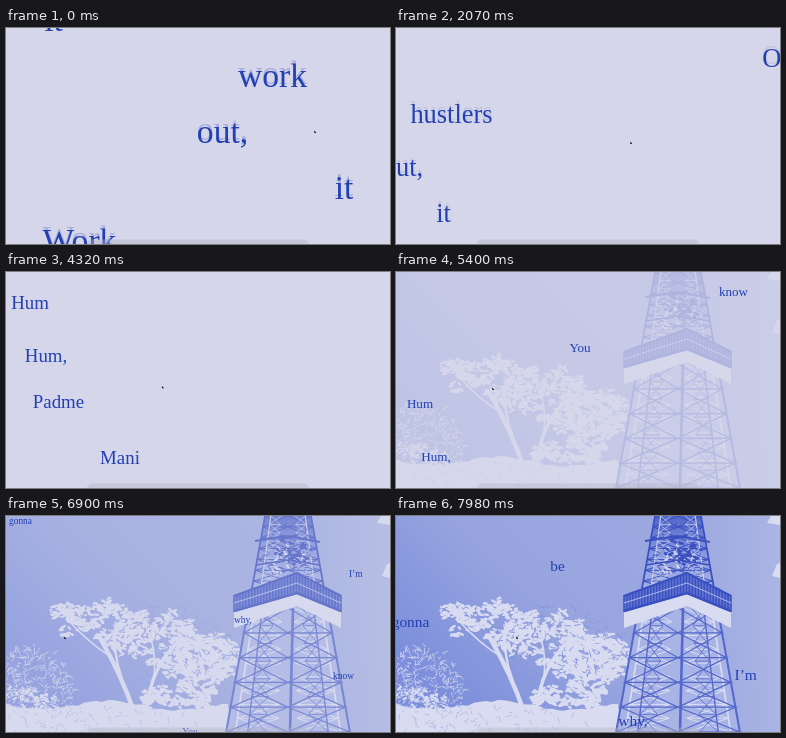
These frames come from a looping animation (384x216 px, 8000 ms). An HTML page with a canvas:

```html
<!DOCTYPE html>
<html lang="en">
<head>
<meta charset="utf-8">
<title>Falling words</title>
<style>
html, body { margin: 0; width: 100%; height: 100%; overflow: hidden; background: #d5d6e9; }
canvas { display: block; width: 100vw; height: 100vh; }
</style>
</head>
<body>
<canvas id="stage" width="384" height="216"></canvas>
<script>
const W = 384, H = 216, LOOP = 8000, STEP = 30;
const ctx = document.getElementById('stage').getContext('2d');
const PALE = '#d9dcf0', MID = '#8293dc', BLUE = '#5468cb', DEEP = '#3a50c0';

// Words in reading order, stacked upwards, each centred on its own column.
const words = 'Work it out, work it out, hustlers, Om Mani Padme Hum, Hum You know why, I\u2019m gonna be'
  .replace('hustlers,', 'hustlers').split(' ');
const columns = [73.5, 338, 216.5, 266.5, 47.5, 7, 55.5, 386, 114, 52.5, 40, 24, 184, 337.5, 237, 349.7, 14.5, 161.5];
const gaps = [53, 56, 56, 56, 46];
const FIRST_Y = 213, SPEED = 0.0936;

// Pointer stops: time, x, y. The pointer's x also sets the text size.
const pointer = [
  [0, 309, 104], [850, 309, 104], [2070, 235, 115], [3360, 170, 115],
  [4080, 170, 115], [5400, 97, 117], [6420, 59, 122], [6900, 59, 122], [7980, 121, 122]
];

const mix = (a, b, k) => a + (b - a) * k;

function pointerAt(t) {
  const i = pointer.findIndex(p => p[0] > t);
  if (i < 0) return pointer[pointer.length - 1].slice(1);
  const [t0, x0, y0] = pointer[i - 1], [t1, x1, y1] = pointer[i];
  const k = (t - t0) / (t1 - t0);
  return [mix(x0, x1, k), mix(y0, y1, k)];
}

const photoFade = t => Math.pow(Math.max(0, Math.min(1, (t - 4860) / 3120)), 0.8);

function makePhoto() {
  const cv = document.createElement('canvas');
  cv.width = W;
  cv.height = H;
  const g = cv.getContext('2d');
  let seed = 41;
  const rnd = () => (seed = (seed * 16807) % 2147483647) / 2147483647;

  function trace(pts) {
    g.beginPath();
    pts.forEach(p => g.lineTo(p[0], p[1]));
  }
  function fill(pts, color) {
    trace(pts);
    g.fillStyle = color;
    g.fill();
  }
  function line(pts, color, width) {
    trace(pts);
    g.strokeStyle = color;
    g.lineWidth = width;
    g.stroke();
  }
  function gradient(x0, y0, x1, y1, ...colors) {
    const gr = g.createLinearGradient(x0, y0, x1, y1);
    colors.forEach((c, i) => gr.addColorStop(i / (colors.length - 1), c));
    return gr;
  }
  function within(cx, cy, rx, ry) {
    const a = rnd() * 6.283, r = Math.sqrt(rnd());
    return [cx + Math.cos(a) * r * rx, cy + Math.sin(a) * r * ry];
  }
  // Clumps of small leaves inside an ellipse.
  function foliage(clumps, cx, cy, rx, ry, size, color) {
    g.fillStyle = color;
    for (let i = 0; i < clumps; i++) {
      const [x, y] = within(cx, cy, rx, ry);
      for (let j = 0; j < 9; j++) {
        const [lx, ly] = within(x, y, 9, 5);
        g.beginPath();
        g.ellipse(lx, ly, size * mix(0.6, 1.3, rnd()), size * 0.45, mix(-0.6, 1, rnd()), 0, 6.283);
        g.fill();
      }
    }
  }
  function twigs(n, cx, cy, rx, ry, color) {
    for (let i = 0; i < n; i++) {
      const [x, y] = within(cx, cy, rx, ry);
      const a = rnd() * 6.283, r = mix(2, 7, rnd());
      line([[x, y], [x + Math.cos(a) * r, y + Math.sin(a) * r]], color, 0.9);
    }
  }
  function branch(x0, y0, cx, cy, x1, y1, width) {
    g.beginPath();
    g.moveTo(x0, y0);
    g.quadraticCurveTo(cx, cy, x1, y1);
    g.strokeStyle = PALE;
    g.lineWidth = width;
    g.stroke();
  }

  g.fillStyle = gradient(60, 190, 250, 0, '#7d8fdc', '#97a4df', '#9ba8e0');
  g.fillRect(0, 0, W, H);
  g.fillStyle = gradient(290, 0, W, 0, 'rgba(190,197,234,0)', 'rgba(190,197,234,.45)');
  g.fillRect(290, 0, W, H);
  fill([[375, 0], [W, 0], [W, 9], [371, 7]], PALE);
  fill([[381, 48], [W, 47], [W, 62], [376, 60]], PALE);

  // Shrubs, tree and ground
  twigs(430, 20, 172, 48, 42, '#c9cfee');
  foliage(45, 18, 196, 42, 26, 2.2, PALE);
  twigs(130, 22, 172, 40, 36, MID);
  foliage(32, 98, 106, 46, 20, 2.8, PALE);
  foliage(8, 60, 98, 24, 9, 2.4, PALE);
  foliage(36, 146, 122, 44, 27, 2.8, PALE);
  foliage(74, 192, 146, 36, 38, 3, PALE);
  foliage(20, 170, 180, 40, 12, 3, PALE);
  twigs(150, 160, 130, 66, 42, MID);
  g.lineCap = 'round';
  branch(128, 196, 116, 160, 93, 120, 4.5);
  branch(116, 163, 106, 136, 110, 108, 2.5);
  branch(141, 194, 144, 150, 176, 122, 3.5);
  branch(104, 140, 84, 128, 62, 104, 1.6);
  branch(148, 160, 151, 130, 139, 109, 1.6);
  g.lineCap = 'butt';
  const ground = [[226, H], [0, H]];
  for (let x = 0; x <= 226; x += 6) ground.push([x, 188 + 4 * Math.sin(x / 22) + rnd() * 3]);
  fill(ground, PALE);
  twigs(90, 70, 204, 120, 14, '#b3bce7');

  // Tower: both flanks widen steadily from one axis.
  const axis = 282;
  const at = (k, y) => [axis + k * (23 + y * 0.18), y];
  function body(y0, y1, color) {
    fill([at(-1, y0), at(1, y0), at(1, y1), at(-1, y1)], color);
  }
  function braces(y0, y1, rows, inner, outer, color, width) {
    for (const s of [-1, 1]) {
      for (let i = 0; i < rows; i++) {
        const a = mix(y0, y1, i / rows), b = mix(y0, y1, (i + 1) / rows);
        line([at(s * inner, a), at(s * outer, b), at(s * inner, b), at(s * outer, a)], color, width);
      }
      line([at(s * outer, y0), at(s * outer, y1)], color, width * 1.7);
    }
  }
  body(0, 76, gradient(0, 0, 0, 76, '#5065ca', '#8999dd', '#a9b4e5'));
  braces(0, 76, 7, 0, 1, DEEP, 1);
  braces(0, 76, 9, 0.3, 0.75, '#c6ccec', 0.7);
  twigs(45, axis, 34, 26, 32, DEEP);
  foliage(4, axis, 40, 18, 20, 2, PALE);
  foliage(5, axis, 28, 20, 28, 2.6, DEEP);
  line([at(-1.2, 25), [axis, 20], at(1.15, 26)], DEEP, 2.2);
  line([at(-1, 49), [axis, 44], at(1, 49)], DEEP, 1.4);

  body(90, H, '#a9b4e6');
  braces(92, H, 9, 0.15, 0.85, PALE, 1);
  braces(92, H, 5, 0, 1, BLUE, 1.2);
  braces(92, H, 7, 0.35, 0.65, BLUE, 0.8);
  line([[287, 92], [284, H]], BLUE, 2.6);

  // Observation deck: bands folded at the near corner.
  const fold = (y, drop) => [[228, y + drop], [291, y], [335, y + drop]];
  const band = (top, bottom, color) => fill([...top, ...bottom.reverse()], color);
  band(fold(77, 18), fold(90, 22), PALE);
  band(fold(56, 23), fold(78, 18), '#6075d0');
  for (let i = 0; i <= 36; i++) {
    const x = mix(228, 335, i / 36);
    const u = x < 291 ? (291 - x) / 63 : (x - 291) / 44;
    line([[x, 56 + 23 * u], [x, 78 + 18 * u]], DEEP, 1.5);
  }
  line(fold(57, 23), DEEP, 2);
  line(fold(67, 20), '#b9c1ea', 0.9);
  line(fold(77, 18), DEEP, 2.5);
  return cv;
}

const photo = makePhoto();

function drawWords(t, size) {
  const ghost = Math.max(0, (size - 20) / 13.6) * 0.25;
  ctx.font = size + 'px "Liberation Serif", "Times New Roman", serif';
  ctx.textAlign = 'center';
  ctx.fillStyle = '#2340b2';
  let y = FIRST_Y + t * SPEED + size * 0.33;
  words.forEach((word, i) => {
    ctx.globalAlpha = ghost;
    ctx.fillText(word, columns[i], y - 3);
    ctx.globalAlpha = 1;
    ctx.fillText(word, columns[i], y);
    y -= gaps[i % gaps.length];
  });
}

function drawDock() {
  ctx.fillStyle = 'rgba(176, 178, 196, 0.4)';
  ctx.beginPath();
  ctx.roundRect(81, 211.5, 222, 12, 5);
  ctx.fill();
}

function drawPointer(x, y) {
  ctx.fillStyle = '#10101c';
  ctx.beginPath();
  ctx.moveTo(x - 0.8, y - 1.4);
  ctx.lineTo(x + 1.2, y + 0.6);
  ctx.lineTo(x + 0.3, y + 1.2);
  ctx.lineTo(x - 0.8, y + 0.6);
  ctx.fill();
}

function draw(now) {
  const t = Math.floor((now % LOOP) / STEP) * STEP;
  const [mx, my] = pointerAt(t);
  ctx.fillStyle = '#d5d6e9';
  ctx.fillRect(0, 0, W, H);
  ctx.globalAlpha = photoFade(t);
  ctx.drawImage(photo, 0, 0);
  ctx.globalAlpha = 1;
  drawWords(t, 3.7 + mx * 0.0968);
  drawDock();
  drawPointer(mx, my);
}

let start;
function tick(now) {
  if (start === undefined) start = now;
  draw(now - start);
  requestAnimationFrame(tick);
}
draw(0);
requestAnimationFrame(tick);
</script>
</body>
</html>
```
